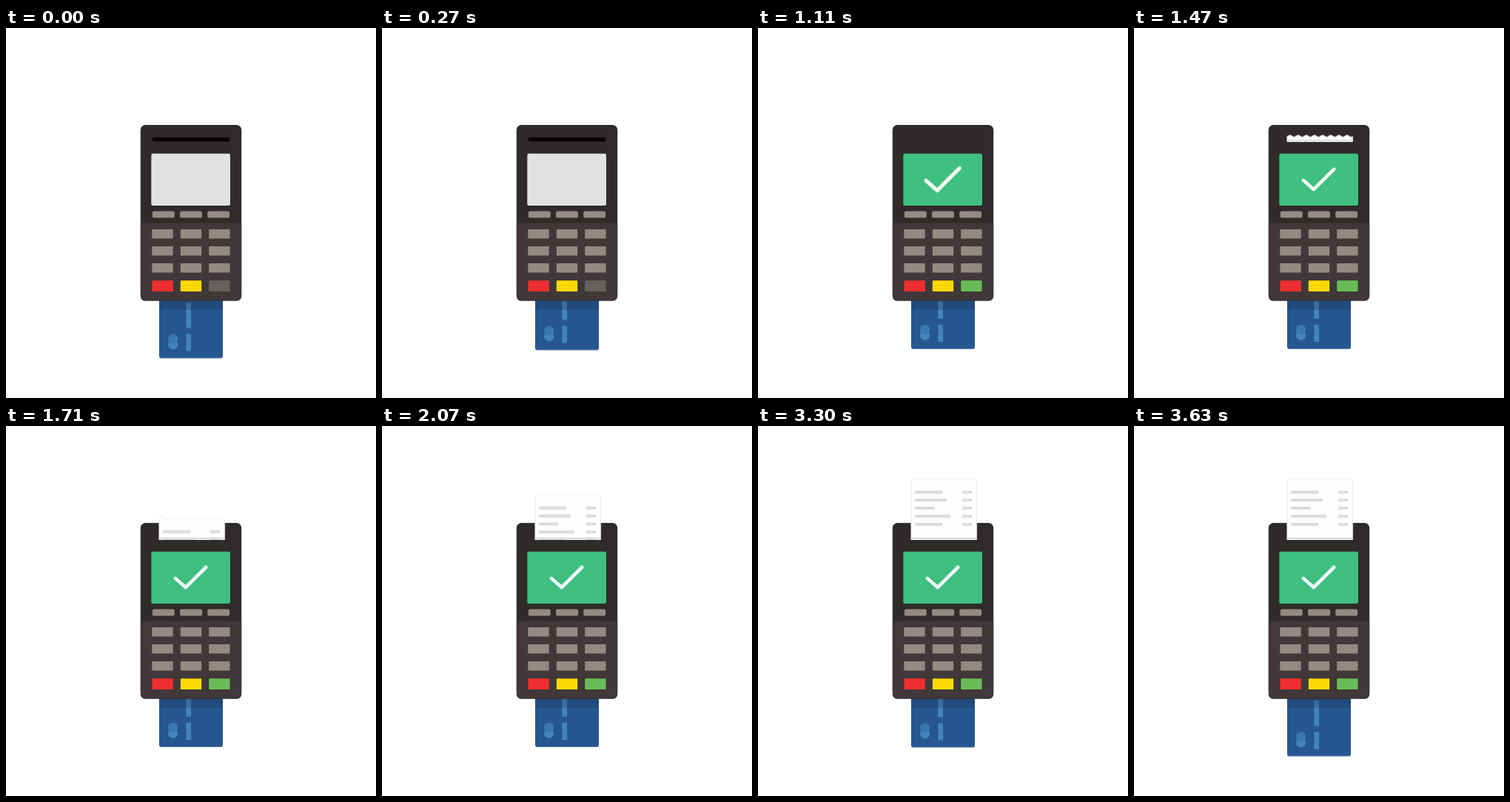
An HTML page that plays this animation: 500x500 px, repeating every 4530 ms.

```html
<!DOCTYPE html>
<html lang="en">
<head>
<meta charset="utf-8">
<title>Card payment</title>
<style>
  html, body { margin: 0; width: 100%; height: 100%; overflow: hidden; background: #fff; }
  svg { display: block; width: 100%; height: 100%; }

  .card, .screen, .check, .ok, .slot, .receipt, .lip {
    animation: 4530ms linear infinite;
  }
  .card { animation-name: card; }
  .screen { animation-name: screen; }
  .check { animation-name: check; transform-origin: 249.7px 204.5px; }
  .ok { animation-name: ok; }
  .slot { animation-name: slot; }
  .receipt { animation-name: receipt; }
  .lip { animation-name: lip; }

  @keyframes card {
    0% { transform: translateY(12.5px); animation-timing-function: cubic-bezier(.3, .1, .7, .9); }
    7.285%, 72.185% { transform: none; animation-timing-function: cubic-bezier(.3, .1, .7, .9); }
    80.132%, 100% { transform: translateY(12.5px); }
  }
  @keyframes screen {
    0%, 13.245% { fill: #e2e2e2; }
    21.192%, 100% { fill: #3fbf80; }
  }
  @keyframes check {
    0%, 19.205% { transform: scale(0); }
    23.179% { transform: scale(1.2); }
    25.828%, 100% { transform: none; }
  }
  @keyframes ok {
    0%, 17.219% { fill: #66615d; }
    22.517%, 100% { fill: #68bd57; }
  }
  @keyframes slot {
    0%, 18.543% { opacity: 1; }
    22.517%, 100% { opacity: 0; }
  }
  @keyframes receipt {
    0%, 29.801% { transform: translateY(85.4px); }
    50.993%, 100% { transform: none; }
  }
  @keyframes lip {
    0%, 30.9% { opacity: 0; }
    31%, 100% { opacity: 1; }
  }
</style>
</head>
<body>
<svg viewBox="0 0 500 500">
  <defs>
    <clipPath id="above-slot"><rect x="200" y="40" width="102" height="114"/></clipPath>
    <g id="soft-key"><rect y="247.5" width="30" height="9" rx="2.6"/></g>
    <g id="key-row">
      <rect x="197.3" width="28.4" height="12.6" rx=".7"/>
      <rect x="235.8" width="28.4" height="12.6" rx=".7"/>
      <rect x="274.2" width="28.4" height="12.6" rx=".7"/>
    </g>
  </defs>

  <g class="card">
    <rect x="207" y="340" width="86" height="93.7" rx="2.8" fill="#275791"/>
    <g fill="#4285bd">
      <rect x="243.4" y="358.5" width="6.6" height="34.2"/>
      <rect x="243.4" y="401" width="6.6" height="23"/>
      <circle cx="225.6" cy="415" r="6.7"/>
      <circle cx="225.6" cy="407.6" r="6.7" fill="#3a78b1"/>
    </g>
  </g>
  <rect x="207" y="368" width="86" height="13" fill="#1c2c48" opacity=".26"/>

  <rect x="181.8" y="131" width="136.4" height="237.8" rx="6.5" fill="#2f2b2a"/>
  <path d="M181.8 263.5H318.2V359Q318.2 367.8 310 367.8H190Q181.8 367.8 181.8 359Z" fill="#403839"/>
  <rect class="slot" x="197.7" y="147.8" width="104.6" height="5.8" rx="1" fill="#080606"/>
  <rect class="screen" x="196.3" y="169.8" width="106.7" height="70.2" rx="2.2"/>
  <path class="check" d="M229 205.8L242.8 218.2L270.2 190.8" fill="none" stroke="#fff"
        stroke-width="4.5" stroke-linecap="round" stroke-linejoin="round"/>

  <g fill="#938a82">
    <use href="#soft-key" x="197.8"/>
    <use href="#soft-key" x="235"/>
    <use href="#soft-key" x="272.2"/>
    <use href="#key-row" y="272"/>
    <use href="#key-row" y="295"/>
    <use href="#key-row" y="318"/>
  </g>
  <rect x="197.5" y="341.2" width="28.4" height="14.8" rx=".7" fill="#ec2f30"/>
  <rect x="235.8" y="341.2" width="28.4" height="14.8" rx=".7" fill="#fcd900"/>
  <rect class="ok" x="274.2" y="341.2" width="28.4" height="14.8" rx=".7"/>

  <g clip-path="url(#above-slot)">
    <g class="receipt">
      <path fill="#fdfdfd" stroke="#e6e6e6" stroke-width=".8" stroke-linejoin="round"
            d="M206.9 250V71.8l4 -2 5.5 3 5.5 -3 5.5 3 5.5 -3 5.5 3 5.5 -3 5.5 3 5.5 -3 5.5 3 5.5 -3 5.5 3 5.5 -3 5.5 3 5.5 -3 5.5 3 2.2 -1V250Z"/>
      <path stroke="#dcdcdc" stroke-width="4"
            d="M212 89.4H249.3M212 100.2H254.8M212 111.1H238.2M212 122.1H259.7M212 133H249.3
               M276 89.4h13M276 100.2h13M276 111.1h13M276 122.1h13M276 133h13"/>
    </g>
    <rect class="lip" x="206.9" y="150.8" width="88.6" height="2" fill="#dadada"/>
  </g>
</svg>
</body>
</html>
```
